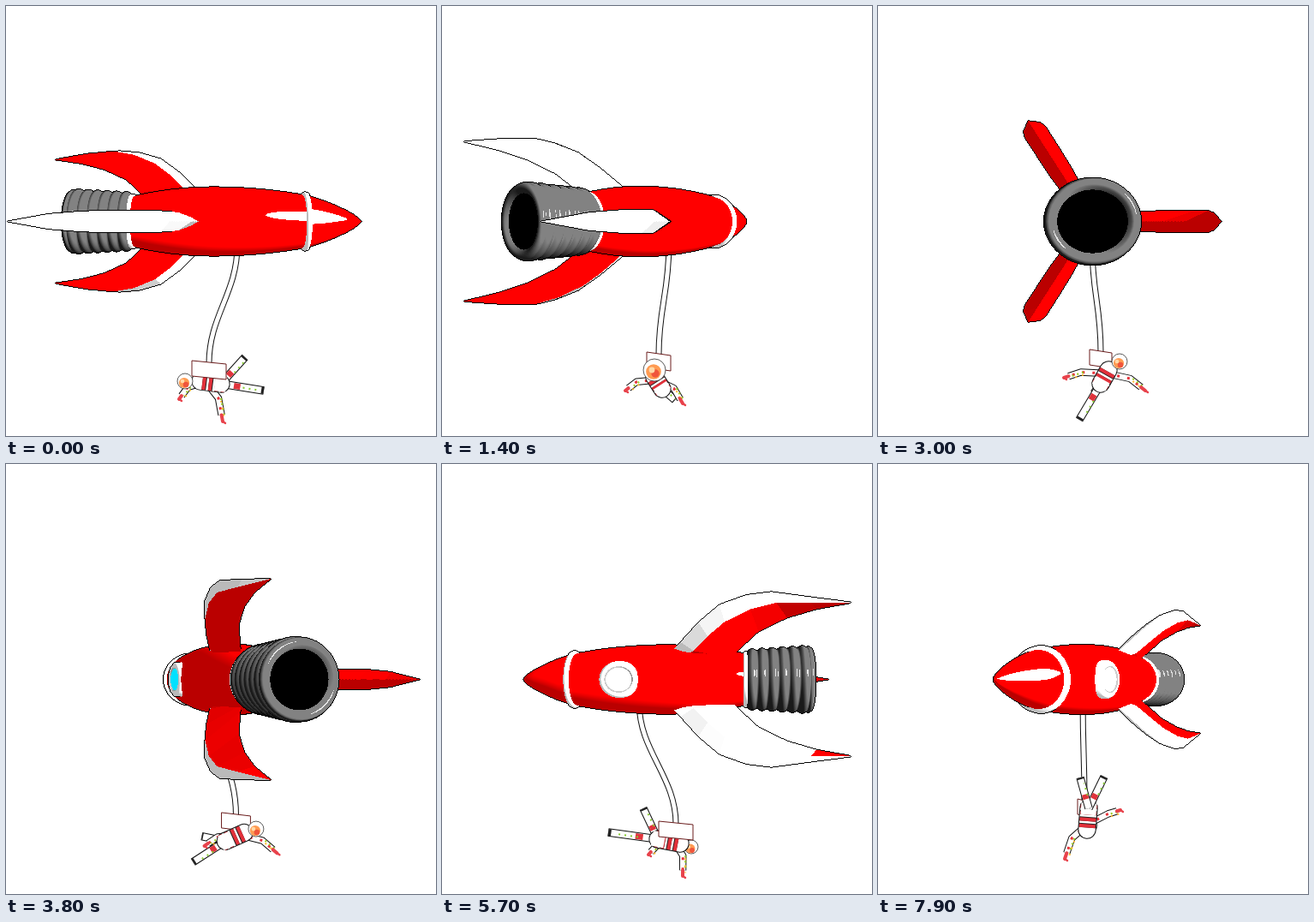
Animation, 502 px wide and 502 px high, one loop 8000 ms. Source, as an HTML page with a canvas:

```html
<!DOCTYPE html>
<html>
<head>
<meta charset="utf-8">
<style>
html, body { margin: 0; width: 100%; height: 100%; overflow: hidden; background: #fff; }
canvas { display: block; width: 502px; height: 502px; }
</style>
</head>
<body>
<canvas id="stage" width="502" height="502"></canvas>
<script>
const SIZE = 502, LOOP = 8000, STEP = 100;
const CX = 250, CY = 251, DIST = 624, SQUASH = 0.9;
const LIGHT = [0.6, 0.34, 0.72];
const COLORS = {
  red: [255, 0, 0], nose: [255, 0, 0], finUp: [255, 0, 0], finLow: [255, 0, 0],
  white: [255, 255, 255], gray: [130, 130, 130], rim: [205, 205, 205],
  black: [0, 0, 0], glass: [0, 225, 255]
};
const SHINE = { red: 0.984, nose: 0.957, gray: 0.993 };

const ctx = document.getElementById('stage').getContext('2d');
const layer = document.createElement('canvas');
layer.width = layer.height = SIZE;
const layerCtx = layer.getContext('2d');
const image = layerCtx.createImageData(SIZE, SIZE);
const pixels = new Uint32Array(image.data.buffer);
const depth = new Float32Array(SIZE * SIZE);

// ---- Rocket model: coordinates are [along the nose, toward fin 0, up] ----
const faces = [];
const along = (a, c, d) => [a, c, d];
const porthole = (a, c, d, shift) => [35 * shift + c, -a, d];

function revolve(mat, profile, place = along, segments = 44) {
  const rows = profile.map(([a, r], i) => {
    const p = profile[Math.max(0, i - 1)], q = profile[Math.min(profile.length - 1, i + 1)];
    const da = q[0] - p[0], dr = q[1] - p[1], len = Math.hypot(da, dr) || 1;
    return Array.from({ length: segments + 1 }, (_, j) => {
      const th = j / segments * 2 * Math.PI, c = Math.cos(th), s = Math.sin(th);
      return { p: place(a, r * c, r * s, 1), n: place(-dr / len, c * da / len, s * da / len, 0) };
    });
  });
  for (let i = 0; i + 1 < rows.length; i++)
    for (let j = 0; j < segments; j++)
      faces.push({ mat, v: [rows[i][j], rows[i][j + 1], rows[i + 1][j + 1], rows[i + 1][j]] });
}

const range = (n, f) => Array.from({ length: n + 1 }, (_, i) => f(i / n));

function flatQuad(mat, pts, side) {
  const sub = (a, b) => a.map((x, i) => x - b[i]);
  const u = sub(pts[2], pts[0]), w = sub(pts[3], pts[1]);
  let n = [u[1] * w[2] - u[2] * w[1], u[2] * w[0] - u[0] * w[2], u[0] * w[1] - u[1] * w[0]];
  const len = Math.hypot(...n) || 1;
  const sign = n[0] * side[0] + n[1] * side[1] + n[2] * side[2] < 0 ? -1 : 1;
  n = n.map(x => x * sign / len);
  faces.push({ mat, v: pts.map(p => ({ p, n })) });
}

// Fin stations: outer ridge (axial, radial), inner ridge (axial, radial), half width
const FIN = [
  [-20, 40, -75, 25, 3], [-31, 53, -84, 30, 11], [-52, 79, -88, 33, 12], [-75, 101, -94, 41, 12],
  [-103, 112, -116, 66, 11.5], [-128, 115, -145, 83, 11], [-165, 108, -174, 93, 8], [-209, 100, -209, 100, 0]
];

function addFin(k) {
  const phi = k * 2 * Math.PI / 3, c = Math.cos(phi), s = Math.sin(phi);
  const at = (a, r, w) => [a, r * c - w * s, r * s + w * c];
  for (const side of [-1, 1]) {
    const rows = FIN.map(([oa, or, ia, ir, w]) => ({
      outer: at(oa, or, 0), inner: at(ia, ir, 0),
      edge: at(oa + 0.28 * (ia - oa), or + 0.28 * (ir - or), side * w)
    }));
    const facing = [0, -s * side, c * side];
    for (let i = 0; i + 1 < rows.length; i++) {
      const a = rows[i], b = rows[i + 1];
      let mat = 'red';
      if (side < 0 && k === 1) mat = 'finUp';
      if (side < 0 && k === 2 && i < FIN.length - 2) mat = 'finLow';
      flatQuad('white', [a.outer, b.outer, b.edge, a.edge], facing);
      flatQuad(mat === 'red' ? 'finPlain' : mat, [a.edge, b.edge, b.inner, a.inner], facing);
    }
  }
}
COLORS.finPlain = COLORS.red;

revolve('red', range(24, t => {
  const s = -105 + 205 * t, d = s + 8;
  return [s, 44.5 - (d > 0 ? 10.5 * (d / 106) ** 2 : 11.5 * (d / 92) ** 2)];
}));
revolve('nose', [[99, 34], [110, 30.5], [122, 26], [134, 20.5], [145, 15], [154, 9.5], [160, 5], [164, 0]]);
revolve('white', [[95, 33], [95.5, 36.5], [98, 38], [101, 37], [102, 32]]);
revolve('white', [[-109, 31], [-108, 35], [-101, 35.5], [-100, 32]]);
revolve('black', [[-140, 0], [-140, 28], [-171, 30]]);
revolve('gray', [[-171, 30], [-174, 33], [-175, 36], [-174, 39], [-171, 41],
  ...range(48, t => [-170 + 66 * t, 39 - 4 * t + 3 * Math.abs(Math.sin(6 * Math.PI * t))])]);
revolve('white', [[34, 23], [43, 22.5], [45.5, 19.5], [45.5, 16]], porthole, 32);
revolve('rim', [[45.5, 16], [44.5, 14.6]], porthole, 32);
revolve('glass', [[44.5, 14.6], [44.6, 0]], porthole, 32);
[0, 1, 2].forEach(addFin);

// ---- Software renderer ----
function shade(mat, n, x, y, flash) {
  if (flash[mat]) return 0xffffffff;
  const base = COLORS[mat], len = Math.hypot(n[0], n[1], n[2]) || 1;
  const dot = v => (n[0] * v[0] + n[1] * v[1] + n[2] * v[2]) / len;
  const lit = dot(LIGHT);
  if (SHINE[mat]) {
    const h = [LIGHT[0] - (x - CX) / DIST, LIGHT[1] + (y - CY) / DIST, LIGHT[2] + 1];
    if (dot(h) / Math.hypot(...h) > SHINE[mat]) return mat === 'gray' ? 0xffe6e6e6 : 0xffffffff;
  }
  const k = mat === 'gray' ? Math.min(1, Math.max(0.2, 0.25 + 1.2 * lit))
    : mat === 'glass' ? 1 : Math.min(1, 0.73 + 1.5 * Math.max(0, lit - 0.1));
  return (255 << 24 | base[2] * k << 16 | base[1] * k << 8 | base[0] * k) >>> 0;
}

function fillTriangle(a, b, c, mat, flash) {
  const area = (b.x - a.x) * (c.y - a.y) - (b.y - a.y) * (c.x - a.x);
  if (Math.abs(area) < 1e-6) return;
  const x0 = Math.max(0, Math.ceil(Math.min(a.x, b.x, c.x))), x1 = Math.min(SIZE - 1, Math.max(a.x, b.x, c.x));
  const y0 = Math.max(0, Math.ceil(Math.min(a.y, b.y, c.y))), y1 = Math.min(SIZE - 1, Math.max(a.y, b.y, c.y));
  for (let y = y0; y <= y1; y++)
    for (let x = x0; x <= x1; x++) {
      const u = ((b.x - x) * (c.y - y) - (b.y - y) * (c.x - x)) / area;
      const v = ((c.x - x) * (a.y - y) - (c.y - y) * (a.x - x)) / area;
      const w = 1 - u - v;
      if (u < -1e-6 || v < -1e-6 || w < -1e-6) continue;
      const k = u * a.k + v * b.k + w * c.k, i = y * SIZE + x;
      if (k <= depth[i]) continue;
      depth[i] = k;
      const n = [0, 1, 2].map(j => u * a.n[j] + v * b.n[j] + w * c.n[j]);
      pixels[i] = shade(mat, n, x, y, flash);
    }
}

function drawRocket(deg) {
  const sin = Math.sin(deg * Math.PI / 180), cos = Math.cos(deg * Math.PI / 180);
  const turn = ([s, u, h]) => [-s * sin + u * cos, h, -s * cos - u * sin];
  const flash = {
    finUp: deg > -68 && deg < -33,
    finLow: deg > 64 && deg < 95,
    glass: deg > 62
  };
  pixels.fill(0);
  depth.fill(0);
  for (const f of faces) {
    const v = f.v.map(({ p, n }) => {
      const [x, y, z] = turn(p), k = DIST / (DIST - z);
      return { x: CX + x * k, y: CY - y * k * SQUASH, k, n: turn(n) };
    });
    fillTriangle(v[0], v[1], v[2], f.mat, flash);
    fillTriangle(v[0], v[2], v[3], f.mat, flash);
  }
  // Ink the farther side of every depth step
  for (let i = SIZE; i < depth.length - SIZE; i++) {
    const near = Math.max(depth[i - 1], depth[i + 1], depth[i - SIZE], depth[i + SIZE]);
    if (near - depth[i] > 0.027) pixels[i] = 0xff000000;
  }
  layerCtx.putImageData(image, 0, 0);
  ctx.drawImage(layer, 0, 0);
}

// ---- Astronaut: time, then head, chest, hip, hands, feet, pack, pack half width ----
const POSES = [
  [0, 209, 438, 227, 438, 251, 441, 202, 459, 253, 485, 279, 410, 301, 449, 237, 425, 20],
  [1400, 248, 425, 248, 433, 257, 447, 214, 449, 281, 464, 262, 448, 272, 460, 253, 415, 14],
  [3000, 282, 415, 269, 425, 260, 441, 217, 434, 312, 449, 252, 452, 235, 483, 260, 412, 13],
  [4600, 297, 440, 284, 438, 252, 440, 251, 463, 307, 461, 209, 414, 204, 441, 276, 425, 21],
  [5700, 291, 447, 278, 443, 252, 438, 281, 481, 241, 456, 235, 402, 194, 430, 273, 428, 20],
  [6500, 268, 441, 264, 440, 249, 430, 283, 468, 220, 455, 250, 389, 204, 419, 264, 423, 17],
  [7900, 248, 422, 244, 427, 246, 402, 283, 404, 218, 461, 264, 365, 236, 366, 241, 402, 8]
];

function poseAt(t) {
  let i = 0;
  while (i < POSES.length - 2 && t >= POSES[i + 1][0]) i++;
  const slope = (j, c) => {
    const p = POSES[Math.max(0, j - 1)], q = POSES[Math.min(POSES.length - 1, j + 1)];
    return (q[c] - p[c]) / (q[0] - p[0]);
  };
  const a = POSES[i], b = POSES[i + 1], span = b[0] - a[0], u = Math.min(1, (t - a[0]) / span);
  const val = c => a[c] * (1 + 2 * u) * (1 - u) ** 2 + b[c] * u * u * (3 - 2 * u)
    + span * u * (1 - u) * ((1 - u) * slope(i, c) - u * slope(i + 1, c));
  const pt = c => [val(c), val(c + 1)];
  return {
    head: pt(1), chest: pt(3), hip: pt(5), hands: [pt(7), pt(9)],
    feet: [pt(11), pt(13)], pack: pt(15), packHalf: val(17)
  };
}

const mix = (a, b, u) => [a[0] + (b[0] - a[0]) * u, a[1] + (b[1] - a[1]) * u];

function stroke(pts, color, width, dash = [], cap = 'butt') {
  ctx.beginPath();
  pts.forEach(p => ctx.lineTo(...p));
  ctx.strokeStyle = color;
  ctx.lineWidth = width;
  ctx.lineCap = cap;
  ctx.lineJoin = 'round';
  ctx.setLineDash(dash);
  ctx.stroke();
  ctx.setLineDash([]);
}

function tube(pts, width, cap = 'butt') {
  stroke(pts, '#111', width + 1.4, [], cap);
  stroke(pts, '#fff', width - 0.6, [], cap);
}

function disc([x, y], r, fill, line) {
  ctx.beginPath();
  ctx.arc(x, y, r, 0, 2 * Math.PI);
  ctx.fillStyle = fill;
  ctx.fill();
  if (line) { ctx.strokeStyle = line; ctx.lineWidth = 0.8; ctx.stroke(); }
}

function drawLeg(hip, foot) {
  const knee = mix(hip, foot, 0.45);
  tube([hip, foot], 8);
  stroke([mix(hip, foot, 0.3), knee], '#e0343c', 7);
  stroke([mix(foot, hip, 0.06), foot], '#222', 8);
  stroke([knee, mix(hip, foot, 0.85)].map(p => [p[0] + 3, p[1] + 1]), '#8c3', 2, [2, 5]);
}

function drawArm(chest, hip, hand) {
  const root = mix(chest, hip, 0.25), mid = mix(root, hand, 0.5);
  const elbow = [mid[0] + Math.sign(hand[0] - chest[0]) * 5, mid[1] - 4];
  const wrist = mix(elbow, hand, 0.72);
  tube([root, elbow, wrist], 7);
  stroke([mix(root, elbow, 0.45), elbow, wrist], '#e8323a', 3, [3, 9]);
  stroke([elbow, wrist].map(p => [p[0] + 3, p[1]]), '#9c2', 2.2, [2, 4]);
  stroke([elbow, wrist].map(p => [p[0] + 3, p[1] + 3]), '#fb3', 2, [2, 6]);
  stroke([wrist, hand], '#e8434c', 4, [], 'round');
  stroke([hand, [hand[0] + 3, hand[1] + 2]], '#e8434c', 2.4, [], 'round');
}

function drawHead(p, r) {
  disc(p, r, '#fff', '#333');
  disc([p[0] - 1, p[1] + 2], r * 0.68, '#ff9b52');
  disc([p[0] + 1, p[1] + 4], r * 0.36, '#f0553c');
  disc([p[0] - 3, p[1]], r * 0.26, '#ffd9a8');
}

function drawPack([x, y], half) {
  ctx.beginPath();
  [[-half, -11], [half, -7], [half, 11], [-half, 7]].forEach(([dx, dy]) => ctx.lineTo(x + dx, y + dy));
  ctx.closePath();
  ctx.fillStyle = '#fff';
  ctx.fill();
  ctx.strokeStyle = '#6a1c1c';
  ctx.lineWidth = 1;
  ctx.stroke();
}

function drawTether(from, to) {
  for (const [color, width] of [['#111', 7], ['#fff', 5]]) {
    ctx.beginPath();
    ctx.moveTo(...from);
    ctx.bezierCurveTo(from[0], from[1] + 55, to[0], to[1] - 55, ...to);
    ctx.strokeStyle = color;
    ctx.lineWidth = width;
    ctx.lineCap = 'butt';
    ctx.stroke();
  }
}

function drawAstronaut(pose, t) {
  const { head, chest, hip, hands, feet, pack, packHalf } = pose;
  const headBehind = t > 5000;
  const packFront = t < 900 || (t > 3800 && t < 7000);
  if (!packFront) drawPack(pack, packHalf);
  if (headBehind) drawHead(head, 8);
  if (t < 6000) feet.forEach(f => drawLeg(hip, f));
  hands.forEach(h => drawArm(chest, hip, h));
  tube([chest, hip], 20, 'round');
  stroke([mix(chest, hip, 0.1), mix(chest, hip, 1.2)], '#222', 20, [5, 2.5]);
  stroke([mix(chest, hip, 0.1), mix(chest, hip, 1.2)], '#e2303a', 19, [4, 3.5]);
  stroke([mix(chest, hip, 0.7), mix(chest, hip, 1.25)], '#fff', 18);
  if (t >= 6000) feet.forEach(f => drawLeg(hip, f));
  if (packFront) drawPack(pack, packHalf);
  if (!headBehind) drawHead(head, t > 700 && t < 2300 ? 13 : 9);
}

function render(t) {
  const deg = -90 + 30 * t / 1000;
  const pose = poseAt(t);
  ctx.fillStyle = '#fff';
  ctx.fillRect(0, 0, SIZE, SIZE);
  drawTether([CX - 20 * Math.sin(deg * Math.PI / 180), 280], [pose.pack[0], pose.pack[1] - 8]);
  drawAstronaut(pose, t);
  drawRocket(deg);
}

const start = performance.now();
let shown = -1;
function tick() {
  const t = Math.floor((performance.now() - start) % LOOP / STEP) * STEP;
  if (t !== shown) render(shown = t);
  requestAnimationFrame(tick);
}
tick();
</script>
</body>
</html>
```
